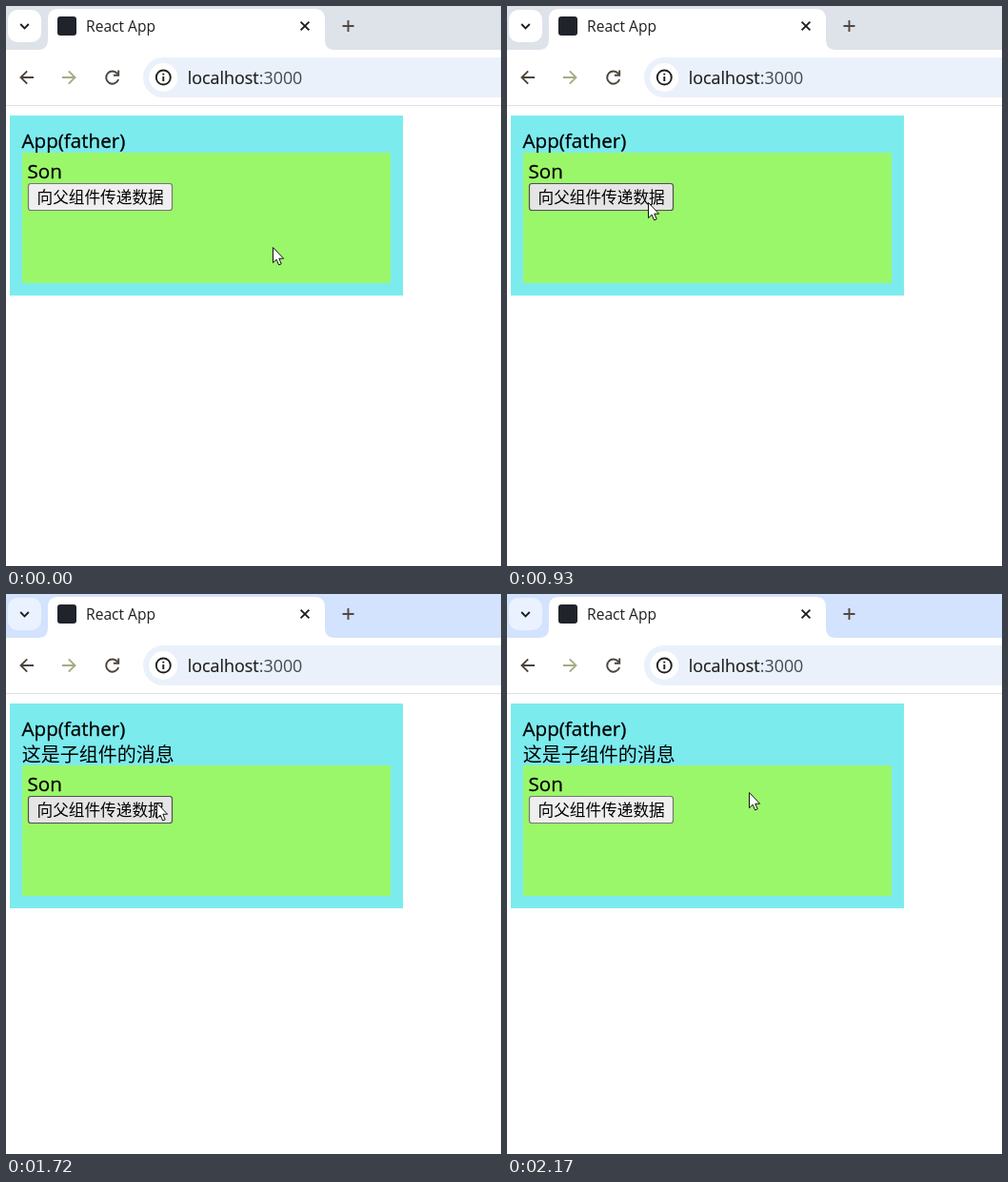
An HTML page that plays this animation: 520 by 588 pixels, repeating every 2.39 s.

```html
<!DOCTYPE html>
<html lang="zh">
<head>
<meta charset="utf-8">
<title>React App</title>
<style>
  html, body { margin: 0; width: 100%; height: 100%; overflow: hidden; background: #fff; }
  svg { display: block; }
  text { font-family: "Open Sans", "Noto Sans CJK SC", "Noto Sans CJK", sans-serif; white-space: pre; }
  .cjk { font-family: "Noto Sans CJK SC", "Noto Sans CJK", sans-serif; }
  .page { stroke: #000; stroke-width: .3; }
  .line { fill: none; stroke-width: 1.9; }
</style>
</head>
<body>
<svg width="520" height="588" viewBox="0 0 520 588">
  <!-- tab strip -->
  <rect id="strip" width="520" height="46"/>
  <rect id="menu" x="2" y="4" width="35" height="34" rx="10"/>
  <path class="line" d="M15.2 19l4.3 4.3 4.3-4.3" stroke="#1f1f1f"/>
  <path d="M34 46Q44 46 44 35V14Q44 3 55 3H324Q335 3 335 14V35Q335 46 345 46Z" fill="#fff"/>
  <rect x="54" y="11" width="20" height="20" rx="3" fill="#20232a"/>
  <text x="84" y="27" font-size="15.6" fill="#1f1f1f">React App</text>
  <path class="line" d="M309.6 16.6l8.8 8.8m0-8.8l-8.8 8.8" stroke="#1f1f1f"/>
  <path class="line" d="M353.5 21h12m-6-6v12" stroke="#54483e"/>

  <!-- toolbar -->
  <path class="line" d="M29 75H15.5m6.7-6.7L15.5 75l6.7 6.7" stroke="#4c443c"/>
  <path class="line" d="M59 75H72.5m-6.7-6.7l6.7 6.7-6.7 6.7" stroke="#a5ab84"/>
  <path class="line" d="M117.2 71.3a6.6 6.6 0 1 0 .9 5.6M118.2 67.6v5.2h-5.3" stroke="#4c443c"/>
  <path d="M520 54H165a21 21 0 0 0 0 42H520Z" fill="#eaf1fb"/>
  <circle cx="165.3" cy="75" r="15" fill="#fff"/>
  <circle class="line" cx="165.3" cy="75" r="7.5" stroke="#1f1f1f"/>
  <path class="line" d="M165.3 74v5m0-8.3v1.9" stroke="#1f1f1f"/>
  <text x="190.7" y="82" font-size="17.9" fill="#1f1f1f" stroke="#1f1f1f" stroke-width=".2">localhost<tspan fill="#454a4f" stroke="none">:3000</tspan></text>
  <rect y="104" width="520" height="1" fill="#dfe1e5"/>

  <!-- page -->
  <rect id="father" x="4" y="115" width="413" fill="#7cebee"/>
  <text class="page" x="16.5" y="149" font-size="20.6">App(father)</text>
  <text id="message" class="cjk" x="16.8" y="175.5" font-size="20">这是子组件的消息</text>
  <g id="son">
    <rect x="17" y="154" width="387" height="137" fill="#9bf76a"/>
    <text class="page" x="22.5" y="181" font-size="20.6">Son</text>
    <rect id="button" x="23.5" y="186.5" width="151" height="28" rx="2.5" stroke-width="1.2"/>
    <text class="cjk" x="32.5" y="207.2" font-size="16.67">向父组件传递数据</text>
  </g>
  <circle id="click" cx="148" cy="206" r="14.8" fill="#f2c62c" opacity=".65"/>
  <path id="cursor" d="M.5.5V16.6L4.2 13.2L6.6 18.9L9.2 17.8L6.8 12.2H11.6Z" fill="#fff" stroke="#111" stroke-linejoin="round"/>
</svg>
<script>
const $ = id => document.getElementById(id);
const LOOP = 2390, PRESS = 1300, DONE = 1370;

// each move follows a quadratic curve from a over b to c, in n jumps between two times
const moves = [
  { begin: 200, end: 710, n: 8, a: [280, 253], b: [251, 256], c: [163, 208] },
  { begin: 800, end: 930, n: 3, a: [163, 208], b: [155, 207], c: [148, 206] },
  { begin: 1720, end: 2170, n: 7, a: [148, 206], b: [182, 260], c: [254, 208] }
];
const looks = { idle: ["#efefef", "#767676"], hover: ["#e5e5e5", "#4f4f4f"], down: ["#f5f5f5", "#8d8d8d"] };

function pointer(t) {
  const { begin, end, n, a, b, c } = moves.findLast(m => m.begin <= t) ?? moves[0];
  const jumps = Math.floor((t - begin) / (end - begin) * (n - 1) + 1.001);
  const u = Math.max(0, Math.min(1, jumps / n)), v = 1 - u;
  return a.map((p, i) => Math.round(v * v * p + 2 * u * v * b[i] + u * u * c[i]));
}

function set(id, attrs) {
  for (const k in attrs) $(id).setAttribute(k, attrs[k]);
}

function draw(t) {
  const [x, y] = pointer(t);
  const focused = t >= PRESS, done = t >= DONE, down = focused && !done;
  const shift = done ? 26 : 0;
  const over = x < 175 && y >= 186 + shift && y < 215 + shift;
  const [fill, stroke] = looks[down ? "down" : over ? "hover" : "idle"];

  set("strip", { fill: focused ? "#d3e2fd" : "#dee2e9" });
  set("menu", { fill: focused ? "#ebf2ff" : "#fff" });
  set("father", { height: 189 + shift });
  set("son", { transform: `translate(0 ${shift})` });
  set("message", { visibility: done ? "visible" : "hidden" });
  set("button", { fill, stroke });
  set("click", { visibility: down ? "visible" : "hidden" });
  set("cursor", { transform: `translate(${x} ${y})` });
}

let start;
function tick(now) {
  start ??= now;
  draw((now - start) % LOOP);
  requestAnimationFrame(tick);
}
draw(0);
requestAnimationFrame(tick);
</script>
</body>
</html>
```
